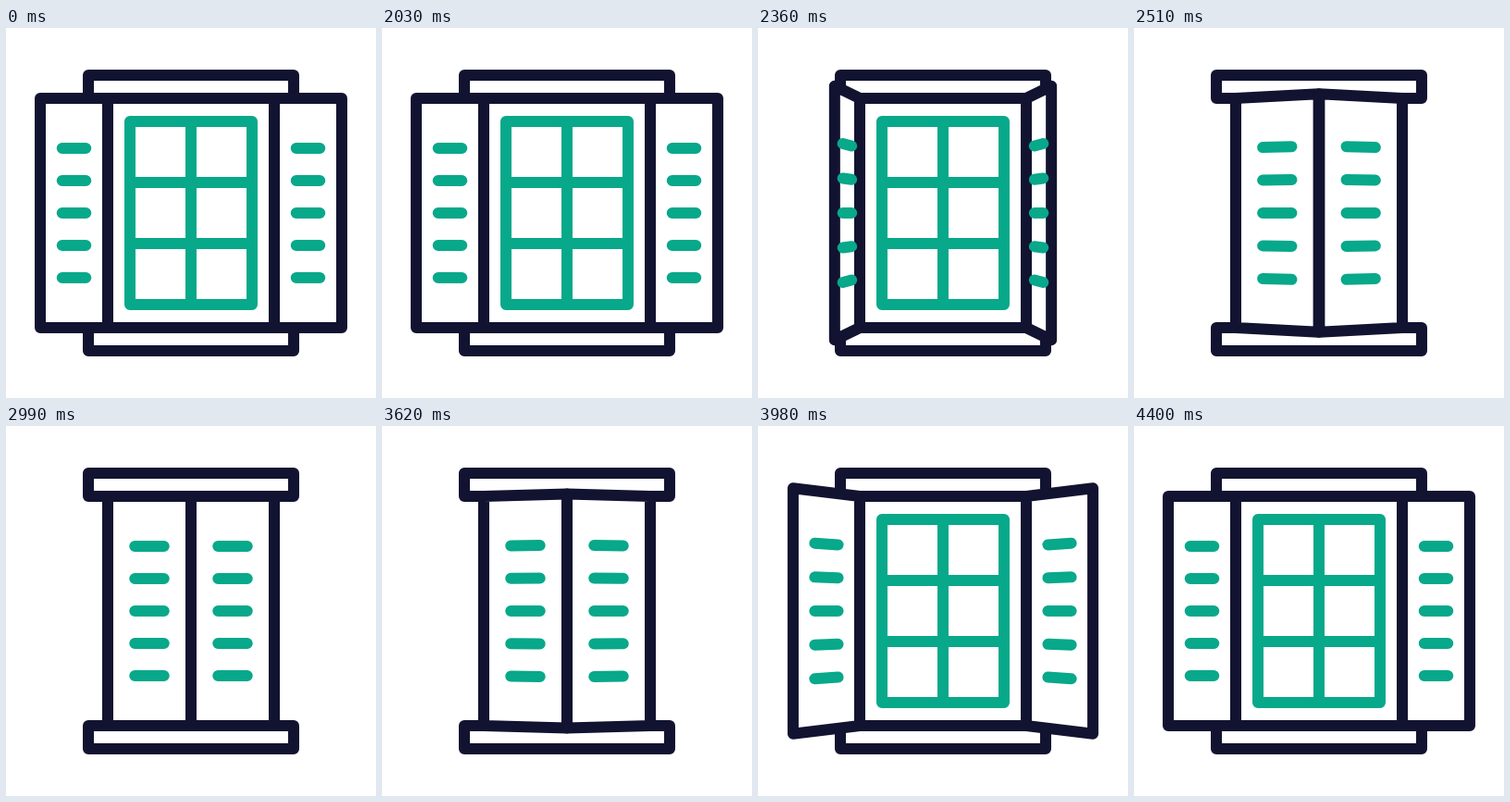
Animation of 400x400 px, one loop 4430 ms. Source, as an HTML page:

```html
<!DOCTYPE html>
<html lang="en">
<head>
<meta charset="utf-8">
<title>Window shutters</title>
<style>
  html, body { margin: 0; height: 100%; overflow: hidden; background: #fff; }
  svg { display: block; width: 100vw; height: 100vh; }
  path { fill: none; stroke-width: 12; stroke-linecap: round; stroke-linejoin: round; }
  .dark { stroke: #121331; }
  .green { stroke: #08a88a; }
  .panel { fill: #fff; }
</style>
</head>
<body>
<svg viewBox="0 0 400 400">
  <path class="green" d="M134 101H266V299H134ZM200 101V299M134 167H266M134 233H266"/>
  <path class="dark" d="M89 51H311V76H89ZM89 324H311V349H89ZM110 76V324M290 76V324"/>
  <g id="shutter">
    <path class="dark panel" id="panel"/>
    <path class="green" id="slats"/>
  </g>
  <use href="#shutter" transform="matrix(-1 0 0 1 400 0)"/>
</svg>
<script>
const LOOP = 4430, CLOSE_AT = 2000, OPEN_AT = 3560;
const HINGE = 110, MIDDLE = 200, HALF = 124;
const CLOSED_REACH = 90, OPEN_REACH = 73, BULGE = 0.06, RISE = 13.3;
const panel = document.getElementById('panel');
const slats = document.getElementById('slats');

// Eases from 0 to 1 with a gathering start and a soft landing
const swing = (elapsed, scale, power) =>
  1 - Math.exp(-((Math.max(0, elapsed) / scale) ** power));

function draw(now) {
  const t = now % LOOP;
  const openness = 1 - swing(t - CLOSE_AT, 400, 4.7) + swing(t - OPEN_AT, 327, 2.65);

  // The free edge follows a squared-off arc around the hinge
  const angle = Math.PI * openness;
  const across = Math.cos(angle);
  const lift = Math.sqrt(Math.abs(Math.sin(angle)));
  const width = across > 0 ? CLOSED_REACH : -OPEN_REACH * (1 + BULGE * lift);
  const reach = width * Math.sqrt(Math.abs(across));
  const rise = RISE * lift;

  // u runs from hinge to free edge, y is the offset from the middle
  const point = (u, y) =>
    `${(HINGE + reach * u).toFixed(2)} ${(MIDDLE + y * (1 + u * rise / HALF)).toFixed(2)}`;
  panel.setAttribute('d',
    `M${point(0, -HALF)}L${point(1, -HALF)}L${point(1, HALF)}L${point(0, HALF)}Z`);
  slats.setAttribute('d', [-70, -35, 0, 35, 70]
    .map(y => `M${point(0.325, y)}L${point(0.675, y)}`).join(''));
  requestAnimationFrame(draw);
}
draw(performance.now());
</script>
</body>
</html>
```
